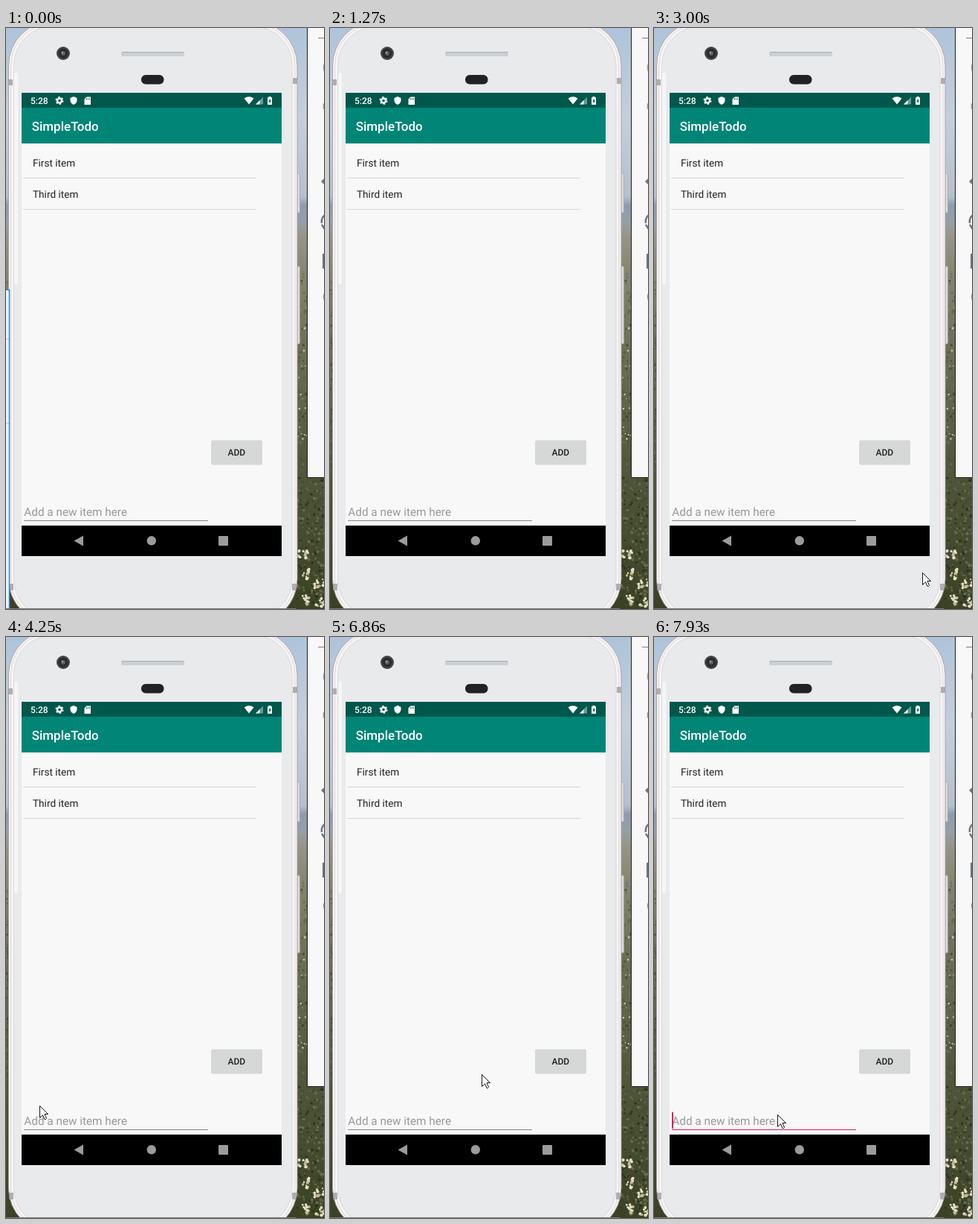
An HTML page for the animation above (8000 ms loop, 428x780 px).

```html
<!DOCTYPE html>
<html lang="en">
<head>
<meta charset="utf-8">
<title>Todo list</title>
<style>
  html, body { margin: 0; width: 100%; height: 100%; overflow: hidden; background: #e7e9eb; }
  svg { display: block; width: 428px; height: 780px; }
  text { font-family: Roboto, "Noto Sans", sans-serif; text-rendering: geometricPrecision; }
  .medium { font-weight: 500; }
</style>
</head>
<body>
<svg viewBox="0 0 428 780" xmlns="http://www.w3.org/2000/svg">
  <defs>
    <linearGradient id="scene" x1="0" y1="0" x2="0" y2="1">
      <stop offset="0" stop-color="#aec3da"/>
      <stop offset=".15" stop-color="#c3cfda"/>
      <stop offset=".29" stop-color="#b4c0cc"/>
      <stop offset=".305" stop-color="#8b9cb1"/>
      <stop offset=".335" stop-color="#959fa6"/>
      <stop offset=".36" stop-color="#969486"/>
      <stop offset=".42" stop-color="#85866f"/>
      <stop offset=".55" stop-color="#6c6f55"/>
      <stop offset=".76" stop-color="#50563a"/>
      <stop offset="1" stop-color="#3a4124"/>
    </linearGradient>
  </defs>

  <rect width="428" height="780" fill="url(#scene)"/>
  <g id="meadow"></g>

  <!-- emulator side panel -->
  <path d="M405.5 -2V603.5H430V-2Z" fill="#f8f8f8" stroke="#1c1c1c"/>
  <g fill="none" stroke="#6c777d" stroke-width="2">
    <path d="M420 13.5H428" stroke="#7c7c7c" stroke-width="1"/>
    <path d="M429 47Q426 53 429 59M429 102H427.500V108H429M429 356Q426 361 429 366" stroke-width="1.500" opacity=".7"/>
    <path d="M429 201L424 206L429 211Z" fill="#6c777d" stroke="none"/>
    <path d="M429 251Q424 255 425 262M425 264L429 270" stroke-width="2.500"/>
    <path d="M429 304H427V322H429"/>
  </g>

  <!-- phone -->
  <g fill="#dcd7d8" stroke="#aaa5a7" stroke-width=".7">
    <rect x="390" y="195" width="5.500" height="53" rx="1.500"/>
    <rect x="390" y="320" width="5.500" height="104" rx="1.500"/>
  </g>
  <rect x="3.500" y="-9.500" width="388.500" height="809" rx="60" fill="#f6f4f4" stroke="#aca5a8"/>
  <rect x="6.500" y="-6.500" width="382.500" height="803" rx="57" fill="none" stroke="#ddd5d7"/>
  <rect x="10.500" y="-2.500" width="374.500" height="795" rx="53" fill="#e8eaec" stroke="#dad8da"/>
  <path d="M3 69H9V77H3ZM386 67H392V75H386ZM4 746H10V755H4ZM385 746H391V755H385Z" fill="#9d999c" opacity=".75"/>
  <rect x="11" y="60" width="5" height="284" rx="2" fill="#f6f6f7"/>
  <rect x="155" y="32" width="85" height="6" rx="2" fill="#cbd0d4"/>
  <path d="M156 32.500H239" stroke="#a5abb0"/>
  <circle cx="77" cy="34" r="9" fill="#434547"/>
  <circle cx="77" cy="34" r="6.500" fill="#292b2c"/>
  <circle cx="77" cy="34" r="3" fill="#56635d"/>
  <circle cx="76" cy="33" r="1.200" fill="#91a096"/>
  <rect x="182" y="63" width="30.500" height="12.500" rx="6" fill="#212226"/>

  <!-- app -->
  <rect x="21" y="87" width="350" height="622" fill="#f8f8f8"/>
  <rect x="21" y="87" width="350" height="21" fill="#00574b"/>
  <rect x="21" y="107" width="350" height="48" fill="#008577"/>
  <g fill="#fff">
    <text class="medium" x="33" y="102" font-size="12">5:28</text>
    <circle cx="72" cy="97.500" r="3" fill="none" stroke="#fff" stroke-width="2.400"/>
    <circle cx="72" cy="97.500" r="4.700" fill="none" stroke="#fff" stroke-width="1.600" stroke-dasharray="2.460"/>
    <path d="M91 92L95.500 94V97.500Q95 101.500 91 103Q87 101.500 86.500 97.500V94Z"/>
    <path d="M108.500 92.500H114V103H105.500V95.500Z"/>
    <path d="M108.500 94V96.500M110.500 94V96.500M112.500 94V96.500" stroke="#00574b" stroke-width=".8"/>
    <path d="M320.500 94.500Q327 90 333.500 94.500L327 102.500Z"/>
    <path d="M336 102.500L346 92.500V102.500Z" opacity=".4"/>
    <path d="M336 102.500L341.500 97V102.500Z"/>
    <path d="M353.500 92H356.500V93.200H358V103H352V93.200H353.500Z"/>
    <path d="M355.700 94.500L353.300 98.700H354.700V101.500L357 97.400H355.700Z" fill="#00574b"/>
    <text class="medium" x="34.700" y="137.700" font-size="17">SimpleTodo</text>
  </g>
  <g font-size="13.600" fill="#212121">
    <text x="36" y="186">First item</text>
    <text x="36" y="228">Third item</text>
  </g>
  <path d="M23 201.500H337M23 243.500H337" stroke="#d6d6d6"/>
  <rect x="276" y="553.500" width="69" height="33" rx="2" fill="#d6d7d7"/>
  <text class="medium" x="310.300" y="574" font-size="12" text-anchor="middle" fill="#1f1f1f">ADD</text>
  <text x="24.300" y="655" font-size="15.300" fill="#999">Add a new item here</text>
  <path id="line" d="M24 661.500H272"/>
  <rect id="caret" x="24" y="638" width="2" height="22" fill="#d81b60"/>
  <rect x="21" y="668" width="350" height="41"/>
  <g fill="#9b9b9b">
    <path d="M91.500 688.500L104 681.500V695.500Z"/>
    <circle cx="195.800" cy="688.300" r="6.200"/>
    <rect x="286" y="682" width="13" height="13" rx="1"/>
  </g>

  <!-- window at the left edge -->
  <g id="win">
    <rect y="352" width="4" height="428" fill="#edf3f8"/>
    <path d="M0 417.500H4M0 530.500H4" stroke="#b5c3cf"/>
    <rect id="hover" x="1" y="352" width="3" height="36" fill="#d5e6f5"/>
    <path d="M0 351.500H4.500V780" fill="none" stroke="#2587dc" stroke-width="1.500"/>
  </g>
  <path d="M0 779.500H390" stroke="#77787a"/>

  <path id="pointer" d="M.5 .5V16.500L4.500 12.800L7 18.500H8.500L9.500 17.500L7 11.500H11.500Z" fill="#fff" stroke="#16161c" stroke-linejoin="round"/>
</svg>
<script>
  const LOOP = 8000;
  const get = id => document.getElementById(id);

  // [ms, x, y]; a step without a place hides the pointer
  const moves = [
    [0], [1820, 78, 374], [1970, 201, 508], [2100, 205, 580], [2220, 206, 599],
    [2490, 325, 597], [2610, 360, 620], [2730, 372, 647], [2880, 373, 695],
    [3000, 361, 731], [3150, 346, 759], [3300, 335, 768], [3430, 324, 776],
    [3550], [4100, 46, 629], [4250, 45, 629], [6280, 190, 708], [6410, 283, 746],
    [6560, 271, 656], [6710, 237, 589], [6860, 204, 587], [6980, 171, 619],
    [7130, 160, 630], [7260, 159, 637], [7380, 166, 641]
  ];
  const at = (steps, t) => steps.filter(s => s[0] <= t).pop();
  const show = (el, on) => el.setAttribute("visibility", on ? "inherit" : "hidden");

  function plantMeadow() {
    let seed = 7;
    const rnd = () => (seed = seed * 16807 % 2147483647) / 2147483647;
    const dot = (x, y, r, fill) => `<circle cx="${x.toFixed(1)}" cy="${y.toFixed(1)}" r="${r.toFixed(1)}" fill="${fill}"/>`;
    const greens = ["#292e1b", "#5d633f", "#454b2b", "#70745a"];
    let out = "";
    for (let i = 0; i < 420; i++) {
      const low = i < 260;
      const x = low ? 392 + rnd() * 36 : (i % 2 ? 392 + rnd() * 13 : rnd() * 4);
      const y = low ? 604 + rnd() * 176 : 330 + rnd() * 274;
      out += `<g opacity="${low ? .8 : .5}">${dot(x, y, .8 + rnd() * 1.4, greens[Math.floor(rnd() * 4)])}</g>`;
    }
    for (const [cx, cy] of [[400, 708], [402, 733], [421, 746], [404, 768], [424, 770]])
      for (let i = 0; i < 12; i++)
        out += dot(cx + (rnd() - .5) * 14, cy + (rnd() - .5) * 13, 1 + rnd() * 1.3, i % 3 ? "#e4dfc6" : "#c2bb91");
    for (let i = 0; i < 20; i++)
      out += dot(393 + rnd() * 12, 335 + rnd() * 230, .7 + rnd() * .7, "#c9c9b6");
    get("meadow").innerHTML = out;
  }

  function draw(t) {
    const [, x, y] = at(moves, t);
    const shown = x !== undefined;
    show(get("pointer"), shown);
    if (shown) get("pointer").setAttribute("transform", `translate(${x} ${y})`);

    show(get("win"), t < 1270);
    show(get("hover"), t >= 680 && t < 1000);

    const focused = t >= 7650;
    show(get("caret"), focused);
    get("line").setAttribute("stroke", focused ? "#d81b60" : "#858585");
  }

  plantMeadow();
  const start = performance.now();
  function tick() {
    draw((performance.now() - start) % LOOP);
    requestAnimationFrame(tick);
  }
  tick();
</script>
</body>
</html>
```
